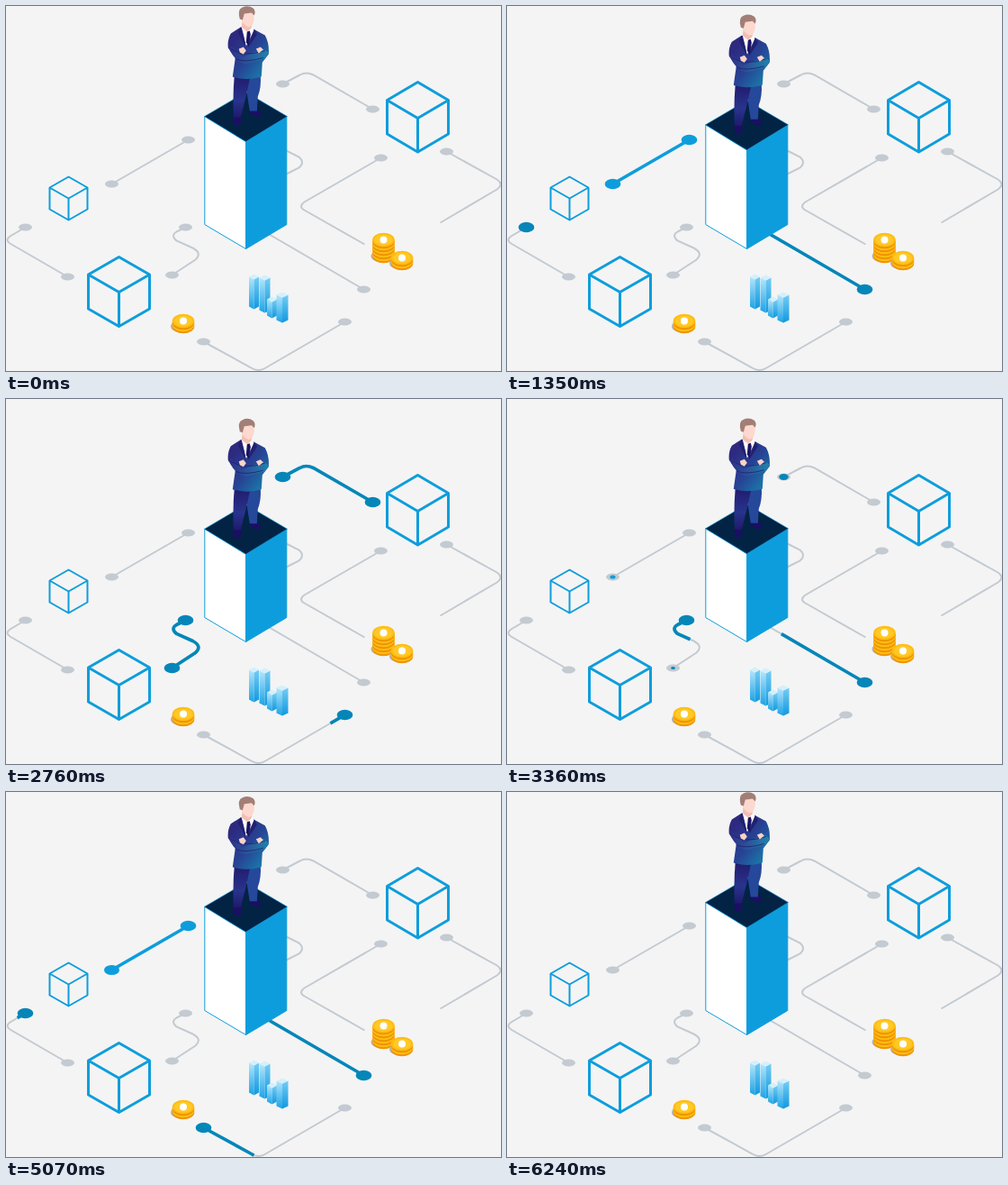
These frames come from a looping animation (550x405 px, 6.27 s). An HTML page:

```html
<!DOCTYPE html>
<html lang="en">
<head>
<meta charset="utf-8">
<title>Connected blocks</title>
<style>
  html, body { margin: 0; width: 100%; height: 100%; overflow: hidden; background: #f4f4f4; }
  svg { display: block; width: 550px; height: 405px; }
</style>
</head>
<body>
<svg id="stage" viewBox="-.5 -.5 550 405">
  <defs>
    <linearGradient id="suit" x1="0" y1="0" x2="1" y2="1">
      <stop offset=".2" stop-color="#2d2a80"/><stop offset=".55" stop-color="#264495"/><stop offset="1" stop-color="#168bb0"/>
    </linearGradient>
    <linearGradient id="leg" x1="0" y1="0" x2="0" y2="1">
      <stop offset="0" stop-color="#221a6c"/><stop offset=".6" stop-color="#28348c"/><stop offset="1" stop-color="#1f1a6c"/>
    </linearGradient>
    <linearGradient id="sleeve">
      <stop offset="0" stop-color="#2e3189"/><stop offset="1" stop-color="#2283ad"/>
    </linearGradient>
    <linearGradient id="pale" x1="0" y1="0" x2="0" y2="1">
      <stop offset="0" stop-color="#b5e6fb"/><stop offset="1" stop-color="#1ba3e6"/>
    </linearGradient>
    <linearGradient id="deep" x1="0" y1="0" x2="0" y2="1">
      <stop offset="0" stop-color="#74cdf5"/><stop offset="1" stop-color="#1298de"/>
    </linearGradient>
  </defs>
  <g id="tracks" fill="none" stroke="#c3cad1" stroke-width="2"></g>
  <g id="signals" fill="none" stroke-width="3.7"></g>
  <g id="props"></g>
  <g stroke="#0e9ddc" stroke-linejoin="round">
    <path id="left" fill="#fff"/>
    <path id="right" fill="#0e9ddc"/>
  </g>
  <g id="rider">
    <path d="M266 95L312 122L266 150L220 122Z" fill="#032345" stroke="#0e9ddc" stroke-width=".6"/>
    <g transform="translate(-.7 0)">
      <path d="M253 120L262 120L261 130Q257 134 253 130ZM271 113L278 113L284 119Q283 123 277 122L270 117Z" fill="#1b0f63"/>
      <path d="M266 76L283 76Q284 90 280 100L279 116L271 116L268 97Z" fill="#25489a"/>
      <path d="M254 76L272 76L267 99L261 123L253 123Q252 98 254 76Z" fill="url(#leg)"/>
      <path d="M261 23L250 30Q246 37 247 46L255 57L252 78Q266 83 284 78L285 62L292 53Q293 41 288 32L275 25Z" fill="url(#suit)"/>
      <path d="M262 23L267 44L276 26L273 21Z" fill="#fff"/>
      <path d="M268 28L271 27L272 31L270 44L267 40Z" fill="#1b1464"/>
      <path d="M261 23L258 29L267 46L264 32ZM276 25L279 31L269 46L273 34Z" fill="#22206f"/>
      <path d="M249 43L263 56L286 47L292 51L288 58L266 64Q256 62 249 49Z" fill="url(#sleeve)"/>
      <path d="M250 47Q264 57 288 49M255 58Q265 63 286 57" fill="none" stroke="#221f70" stroke-width=".8"/>
      <path d="M259 47L264 45L267 49L264 53L260 51ZM278 47L283 45L286 48L281 52Z" fill="#fbd3c8"/>
      <path d="M263 14L274 14L273 24L268 28L262 23Z" fill="#f5beb2"/>
      <path d="M262 5L275 4L276 13Q275 22 270 23Q262 20 261 11Z" fill="#fcd8ce"/>
      <path d="M260 14Q257 3 263 1Q269 -2 275 2Q278 5 276 10L273 7L265 8L263 15Z" fill="#a27e77"/>
    </g>
  </g>
</svg>
<script>
const LOOP = 6270, LIGHT = '#0e9ddc', DEEP = '#0486b9';
const $ = id => document.getElementById(id);

function add(parent, tag, attrs) {
  const el = document.createElementNS('http://www.w3.org/2000/svg', tag);
  for (const key in attrs) el.setAttribute(key, attrs[key]);
  return parent.appendChild(el);
}
const shape = (d, fill) => add($('props'), 'path', { d, fill });
const oval = (cx, cy, rx, ry, fill) => add($('props'), 'ellipse', { cx, cy, rx, ry, fill });

// d: track shape, dots: which ends carry a dot,
// runs: [draw from, draw to, erase from, erase to, backwards]
const tracks = [
  { d: 'M117 197L202 148', dots: [0, 1], color: LIGHT,
    runs: [[650, 1250, 1380, 1900], [3340, 3900, 5060, 5600]] },
  { d: 'M21 245L4 255Q-2 259 4 263L68 300', dots: [0, 1], color: DEEP,
    runs: [[120, 480, 340, 700, 1], [1270, 1620, 1450, 1890], [4060, 4500, 4350, 4800, 1], [4940, 5390, 5200, 5620]] },
  { d: 'M199 245L189 250Q182 254 189 260L207 268Q218 274 210 281L184 298', dots: [0, 1], color: DEEP,
    runs: [[2270, 2720, 3130, 3570, 1]] },
  { d: 'M219 372L272 401Q280 406 288 401L376 350', dots: [0, 1], color: DEEP,
    runs: [[1550, 2000, 2430, 2900], [4870, 5320, 5680, 6130]] },
  { d: 'M292 253L397 314', dots: [1], color: DEEP,
    runs: [[760, 1210, 1420, 1890], [3050, 3500, 3790, 4330, 1], [4480, 4930, 5150, 5620]] },
  { d: 'M307 86L326 76Q333 72 341 76L407 114', dots: [0, 1], color: DEEP,
    runs: [[2180, 2620, 2900, 3320, 1]] },
  { d: 'M416 168L331 217Q324 222 331 226L398 264', dots: [0] },
  { d: 'M489 161L545 192Q553 197 545 203L482 240', dots: [0] },
  { d: 'M311 160L325 167Q332 173 325 179L311 186', dots: [] }
];

for (const track of tracks) {
  const base = add($('tracks'), 'path', { d: track.d });
  const ends = track.dots.map(end => ({ end, at: base.getPointAtLength(end * base.getTotalLength()) }));
  for (const { at } of ends)
    add($('tracks'), 'ellipse', { cx: at.x, cy: at.y, rx: 7.5, ry: 4, fill: '#c3cad1', stroke: 'none' });
  if (!track.runs) continue;
  track.line = add($('signals'), 'path', { d: track.d, pathLength: 1, stroke: track.color });
  track.lamps = ends.map(({ end, at }) => ({
    end, el: add($('signals'), 'ellipse', { cx: at.x, cy: at.y, fill: track.color, stroke: 'none' })
  }));
}

function cube(x, y, w, h, side, width) {
  add($('props'), 'path', {
    d: `M${x} ${y}l${w} ${h}l${-w} ${h}l${-w} ${-h}zm${-w} ${h}v${side}l${w} ${h}l${w} ${-h}v${-side}m${-w} ${h}v${side}`,
    fill: 'none', stroke: LIGHT, 'stroke-width': width, 'stroke-linejoin': 'round'
  });
}
cube(69, 189, 21, 12, 24, 2);
cube(125, 278, 34, 19.5, 38, 3);
cube(457, 84, 34, 20, 37.5, 3);

function coins(x, y, count) {
  oval(x - 1, y + count * 4 + 2, 13, 7, '#b9b2b5');
  for (let i = count; i >= 0; i--) {
    const cy = y + i * 4;
    oval(x, cy + 2, 12.3, 7.7, '#ee9405');
    oval(x, cy, 12.3, 7.7, '#ffbd12');
  }
  oval(x, y, 10, 6, '#ffc928');
  oval(x, y, 4, 4, '#fff');
}
coins(419, 259, 4);
coins(439.5, 279, 1);
coins(196.5, 349, 1);

function bar(x, top, bottom, w) {
  shape(`M${x - w} ${top + 3}L${x} ${top + 6}V${bottom}L${x - w} ${bottom - 3}Z`, 'url(#pale)');
  shape(`M${x + w} ${top + 3}L${x} ${top + 6}V${bottom}L${x + w} ${bottom - 3}Z`, 'url(#deep)');
  shape(`M${x} ${top}l${w} 3l${-w} 3l${-w} -3z`, '#d3f0fc');
}
bar(275, 297, 336, 5.5);
bar(287, 298, 340, 6);
bar(295, 322, 346, 5.5);
bar(306.5, 317, 351, 6.5);

const clamp = u => Math.min(1, Math.max(0, u));
const ramp = (t, from, to) => clamp((t - from) / (to - from));
const ease = u => u < .5 ? 4 * u ** 3 : 1 - 4 * (1 - u) ** 3;

function drawTrack({ runs, line, lamps }, t) {
  const run = runs.find(r => t >= r[0] && t < r[3] + 100);
  let from = 0, to = 0, first = 0, last = 0, back = 0;
  if (run) {
    const [a, b, c, d] = run;
    back = run[4] || 0;
    from = ease(ramp(t, c, d));
    to = ease(ramp(t, a, b));
    first = ramp(t, a, a + 60) * (1 - ramp(t, c, c + 320));
    last = ramp(t, b - 100, b) * (1 - ramp(t, d, d + 100));
    if (back) [from, to] = [1 - to, 1 - from];
  }
  line.style.display = to - from > .002 ? '' : 'none';
  line.setAttribute('stroke-dasharray', `0 ${from} ${to - from} 2`);
  for (const { end, el } of lamps) {
    const size = end === back ? first : last;
    el.setAttribute('rx', 8.8 * size);
    el.setAttribute('ry', 5.8 * size);
  }
}

function frame(now) {
  const t = now % LOOP;
  const drop = 11 * (1 - Math.cos(2 * Math.PI * Math.min(t, 6000) / 6000));
  $('rider').setAttribute('transform', `translate(0 ${drop})`);
  $('left').setAttribute('d', `M220.3 ${122 + drop}L266 ${150 + drop}V269L220.3 242Z`);
  $('right').setAttribute('d', `M311.3 ${122 + drop}L266 ${150 + drop}V269L311.3 242Z`);
  for (const track of tracks) if (track.runs) drawTrack(track, t);
  requestAnimationFrame(frame);
}
frame(performance.now());
</script>
</body>
</html>
```
